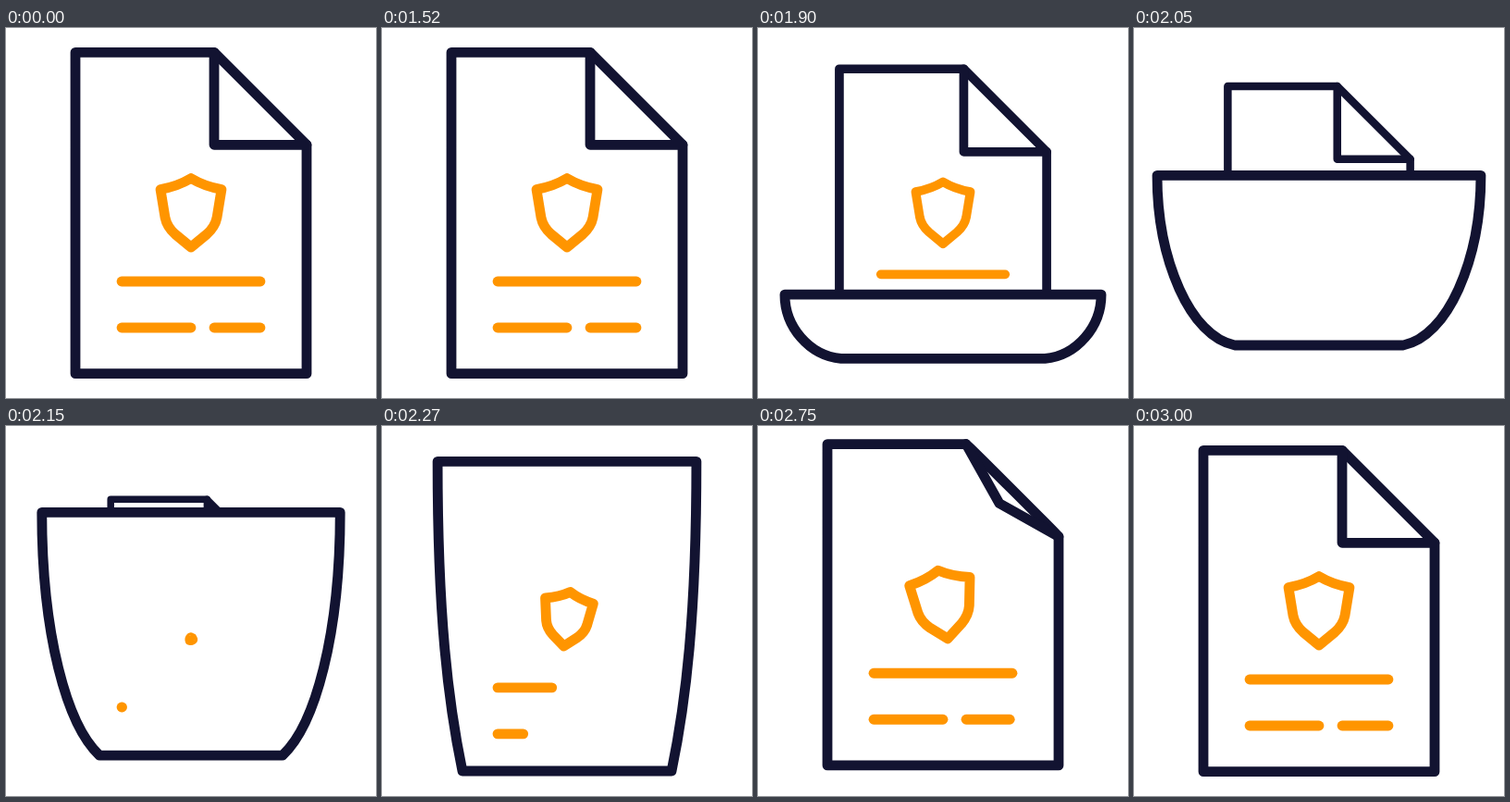
Animation of 400 by 400 pixels, one loop 3020 ms. Source, as an HTML page with a canvas:

```html
<!DOCTYPE html>
<html lang="en">
<head>
<meta charset="utf-8">
<title>Secure document</title>
<style>
  html, body { margin: 0; height: 100%; overflow: hidden; background: #fff; }
  canvas { display: block; width: 100vw; height: 100vh; }
</style>
</head>
<body>
<canvas id="stage" width="400" height="400"></canvas>
<script>
const ctx = document.getElementById('stage').getContext('2d');
const NAVY = '#121331', ORANGE = '#ff9500';
const LOOP = 3020, STROKE = 10.8;
const TOP = 26.3, BOTTOM = 373.7, HALF = 125, FOLD = 100;

// Smooth monotone curve through [time, value] keys.
function track(...keys) {
  const slopes = keys.slice(1).map(([t, v], i) => (v - keys[i][1]) / (t - keys[i][0]));
  const tangents = keys.map((_, i) => {
    const a = slopes[i - 1], b = slopes[i];
    return a * b > 0 ? 2 * a * b / (a + b) : 0;
  });
  return time => {
    if (time <= keys[0][0]) return keys[0][1];
    const i = keys.findIndex(key => key[0] > time) - 1;
    if (i < 0) return keys[keys.length - 1][1];
    const [t0, v0] = keys[i], [t1, v1] = keys[i + 1];
    const d = t1 - t0, u = (time - t0) / d;
    return v0 + (v1 - v0) * u * u * (3 - 2 * u)
      + d * u * (1 - u) * (tangents[i] * (1 - u) - tangents[i + 1] * u);
  };
}

const bowl = {
  top: track([1600, 381], [1750, 376], [2050, 160], [2270, 38.5], [2490, 10.3], [2570, 12.3], [2990, TOP]),
  bottom: track([1600, 381], [1750, 376], [2050, 343], [2270, 373], [2490, 357.7], [2570, 359.7], [2990, BOTTOM]),
  topHalf: track([1590, 0], [1750, 145], [1990, 176], [2050, 175], [2270, 140], [2480, HALF]),
  bottomHalf: track([1590, 0], [1750, 130], [2050, 91], [2270, 113], [2480, HALF]),
  lift: track([2050, 0.05], [2270, 0.22]),
  cut: track([2400, 0], [2560, FOLD]),
  bend: track([2570, 1], [2760, 0]),
  flap: track([2660, 0], [2920, 1]),
};
const content = {
  shift: track([2150, 30], [2270, 9], [2490, -16], [2570, -14], [2990, 0]),
  scale: track([2130, 0], [2270, 0.79], [2480, 1]),
  angle: track([2130, 45], [2270, 7], [2530, -16], [2570, -15.5], [2980, 0]),
};

const clamp = u => Math.min(1, Math.max(0, u));
const easeOut = (t, start, length) => 1 - (1 - clamp((t - start) / length)) ** 2;

function stroke(color) {
  ctx.strokeStyle = color;
  ctx.lineWidth = STROKE;
  ctx.stroke();
}

function polyline(color, ...points) {
  ctx.beginPath();
  points.forEach(p => ctx.lineTo(...p));
  stroke(color);
}

function bar(x, y, length) {
  if (length > 0) polyline(ORANGE, [x, y], [x + length, y]);
}

function shield(scale, angle) {
  if (scale <= 0) return;
  ctx.save();
  ctx.translate(200, 200.5);
  ctx.rotate(angle * Math.PI / 180);
  ctx.scale(scale, scale);
  ctx.beginPath();
  ctx.moveTo(0, -38);
  ctx.quadraticCurveTo(-14, -29.5, -33, -26);
  ctx.lineTo(-28, 4.5);
  ctx.quadraticCurveTo(-26, 14.5, -17, 22.5);
  ctx.lineTo(0, 36.5);
  ctx.lineTo(17, 22.5);
  ctx.quadraticCurveTo(26, 14.5, 28, 4.5);
  ctx.lineTo(33, -26);
  ctx.quadraticCurveTo(14, -29.5, 0, -38);
  ctx.closePath();
  ctx.restore();
  stroke(ORANGE);
}

function contents(scale, angle, first, second) {
  shield(scale, angle);
  bar(125, 274, 150 * first);
  const drawn = 125 * second;
  bar(125, 324, Math.min(75, drawn));
  bar(225, 324, drawn - 75);
}

// Container outline: curved sides and a top right corner that can be cut.
function outline({ top, bottom, topHalf, bottomHalf, lift, cut, bend, flap }) {
  const height = bottom - top, right = 200 + topHalf;
  const inset = (topHalf - bottomHalf) * 0.57;
  const handle = bottomHalf + inset, handleY = bottom - height * lift;
  const round = cut * (1 - bend);
  ctx.beginPath();
  ctx.moveTo(200 - topHalf, top);
  ctx.lineTo(right - cut, top);
  ctx.bezierCurveTo(right - round, top, right, top + round, right, top + cut);
  ctx.bezierCurveTo(right, top + Math.max(cut, height / 2), 200 + handle, handleY, 200 + bottomHalf, bottom);
  ctx.lineTo(200 - bottomHalf, bottom);
  ctx.bezierCurveTo(200 - handle, handleY, 200 - topHalf, top + height / 2, 200 - topHalf, top);
  ctx.closePath();
  ctx.fillStyle = '#fff';
  ctx.fill();
  stroke(NAVY);
  if (flap > 0) {
    const reach = cut * (1 + flap) / 2;
    polyline(NAVY, [right - cut, top], [right - reach, top + reach], [right, top + cut]);
  }
}

const page = {
  top: TOP, bottom: BOTTOM, topHalf: HALF, bottomHalf: HALF,
  lift: 0.2, cut: FOLD, bend: 0, flap: 1,
};

function leavingPage(t) {
  const scale = 1 - 0.21 * Math.max(0, (t - 1520) / 530) ** 2.15;
  ctx.save();
  ctx.translate(200, 200);
  ctx.scale(scale, scale);
  ctx.translate(-200, -200);
  outline(page);
  contents(1, 0, 1, 1);
  ctx.restore();
}

function arrivingPage(t) {
  const pose = {};
  for (const name in bowl) pose[name] = bowl[name](t);
  outline(pose);
  if (t < 2130) return;
  ctx.save();
  ctx.translate(0, content.shift(t));
  contents(content.scale(t), content.angle(t), easeOut(t, 2150, 550), easeOut(t, 2194, 654));
  ctx.restore();
}

function draw(now) {
  const t = now % LOOP;
  ctx.fillStyle = '#fff';
  ctx.fillRect(0, 0, 400, 400);
  ctx.lineCap = ctx.lineJoin = 'round';
  if (t < 2220) leavingPage(t);
  if (t > 1590) arrivingPage(t);
}

const start = performance.now();
function tick() {
  draw(performance.now() - start);
  requestAnimationFrame(tick);
}
tick();
</script>
</body>
</html>
```
